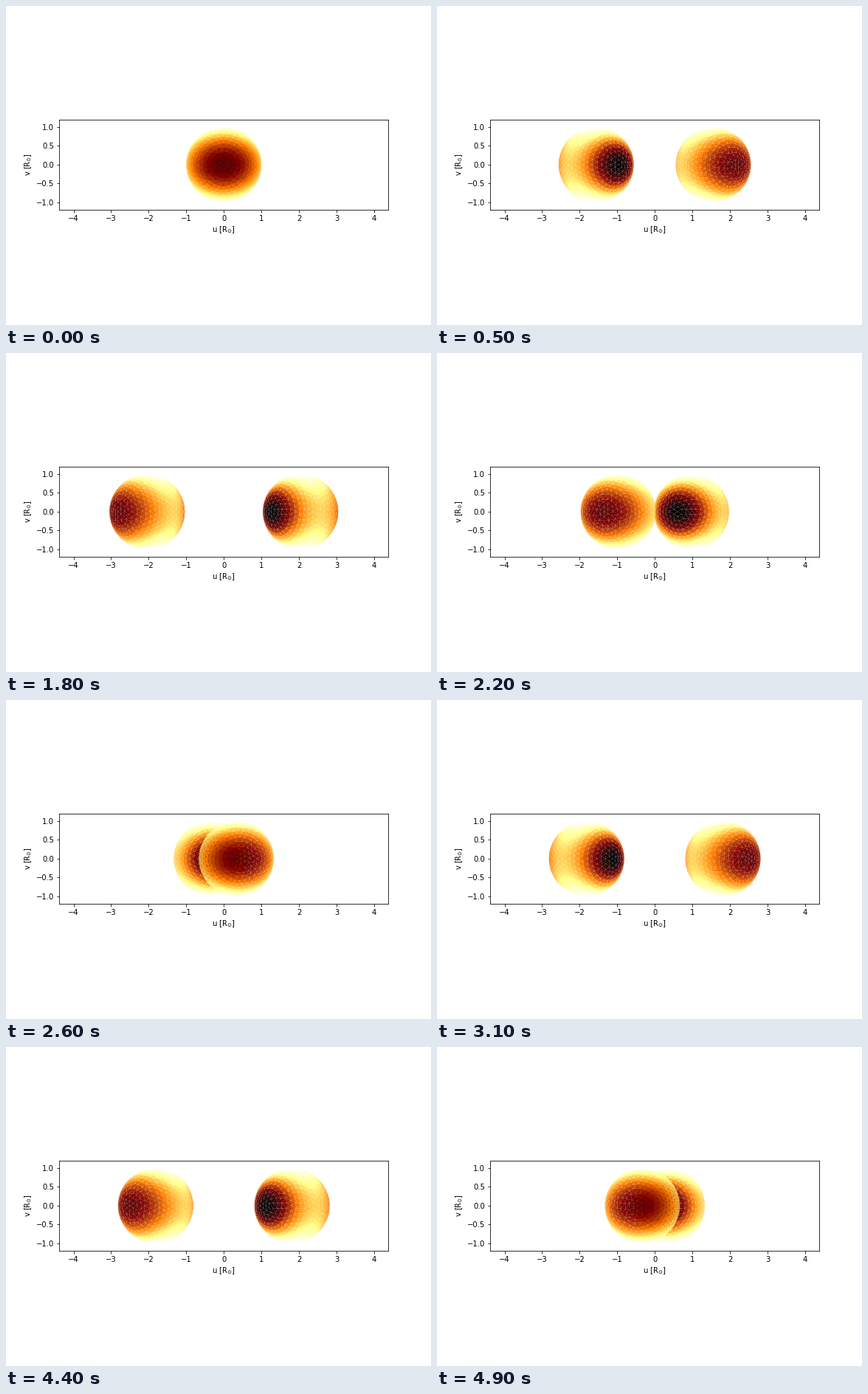
These frames come from a looping animation (576x432 px, 5 s). A matplotlib script:

```python
import numpy as np
import matplotlib.pyplot as plt
from matplotlib.animation import FuncAnimation
from matplotlib.collections import PolyCollection
from matplotlib.tri import Triangulation

FRAMES = 50
SMA = 5.3             # orbital separation in solar radii
POLE = 0.992 / SMA    # polar radius in units of the separation
N_RINGS = 26
EDGE = 0.139          # typical triangle side on the unit sphere


def sphere_mesh():
    """Rings of points around the +x axis, triangulated in a stereographic plane."""
    rng = np.random.default_rng(4)
    theta, phi = [0.0], [0.0]
    for k in range(1, N_RINGS):
        t = k * np.pi / N_RINGS
        n = max(6, round(2 * np.pi * np.sin(t) / EDGE))
        wobble = 0.0 if k == N_RINGS - 1 else EDGE * (0.02 + 0.12 * (t / np.pi) ** 2)
        theta.extend(t + wobble * rng.normal(size=n).clip(-2, 2))
        phi.extend((np.arange(n) + 0.5 * (k % 2)) * 2 * np.pi / n
                   + wobble * rng.normal(size=n) / np.sin(t))
    theta, phi = np.array(theta), np.array(phi)

    rho = np.tan(theta / 2)
    tris = Triangulation(rho * np.cos(phi), rho * np.sin(phi)).triangles

    # close the small hole around the far point with a fan
    far = len(theta)
    last = np.arange(far - n, far)
    fan = np.column_stack([last, np.roll(last, -1), np.full(n, far)])
    theta, phi = np.append(theta, np.pi), np.append(phi, 0.0)
    points = np.column_stack([np.cos(theta),
                              np.sin(theta) * np.cos(phi),
                              np.sin(theta) * np.sin(phi)])
    return points, np.vstack([tris, fan])


def roche_surface(dirs):
    """Equipotential surface for two equal, synchronous stars."""
    omega = 1 / POLE + 1 / np.hypot(1, POLE)
    l, n = dirs[:, 0], dirs[:, 2]
    r = np.full(len(dirs), POLE)
    for _ in range(20):
        rest = 1 / np.sqrt(1 - 2 * l * r + r**2) - l * r + r**2 * (1 - n**2)
        r = 1 / (omega - rest)
    return dirs * r[:, None]


def temperature(p):
    """Gravity-darkened temperature, up to a constant factor."""
    x_axis = np.array([1.0, 0.0, 0.0])
    d = p - x_axis
    g = (-p / np.linalg.norm(p, axis=1, keepdims=True) ** 3
         - d / np.linalg.norm(d, axis=1, keepdims=True) ** 3
         - x_axis + 2 * p * [1, 1, 0])
    return np.linalg.norm(g, axis=1) ** 0.08


dirs, tris = sphere_mesh()
surface = roche_surface(dirs)
teff = temperature(surface)[tris].mean(axis=1)
colors = plt.get_cmap("afmhot")((teff - teff.min()) / np.ptp(teff))

corners = SMA * surface[tris]
normals = np.cross(corners[:, 1] - corners[:, 0], corners[:, 2] - corners[:, 0])
outward = np.sum(normals * corners.mean(axis=1), axis=1)
normals *= np.sign(outward)[:, None]

plt.rcParams.update({"font.family": "DejaVu Sans", "font.size": 10})
fig, ax = plt.subplots(figsize=(8, 6), dpi=72)
fig.subplots_adjust(left=0.125, right=0.9, bottom=0.125, top=0.88)
ax.set_aspect("equal")
ax.set_xlim(-4.383, 4.383)
ax.set_ylim(-1.193, 1.193)
ax.set_xticks(range(-4, 5))
ax.set_yticks([-1, -0.5, 0, 0.5, 1])
# braces keep the symbol from being spaced like a binary operator
ax.set_xlabel(r"u [R$_{\odot}$]")
ax.set_ylabel(r"v [R$_{\odot}$]")

stars = {side: PolyCollection([], edgecolors="none", linewidths=0) for side in (1, -1)}
for star in stars.values():
    ax.add_collection(star, autolim=False)


def update(frame):
    phase = 2 * np.pi * frame / FRAMES
    s, c = np.sin(phase), np.cos(phase)
    for side, star in stars.items():
        x, y, z = np.moveaxis(corners, -1, 0)
        u = side * ((SMA / 2 - x) * s + y * c)
        facing = side * (-normals[:, 0] * c - normals[:, 1] * s) > 0
        star.set_verts(np.stack([u, z], axis=-1)[facing])
        star.set_facecolor(colors[facing])
        star.set_zorder(1.5 + 0.2 * side * c)
    return list(stars.values())


anim = FuncAnimation(fig, update, frames=FRAMES, interval=100, repeat=True,
                     repeat_delay=0, blit=False)
plt.show()
```
